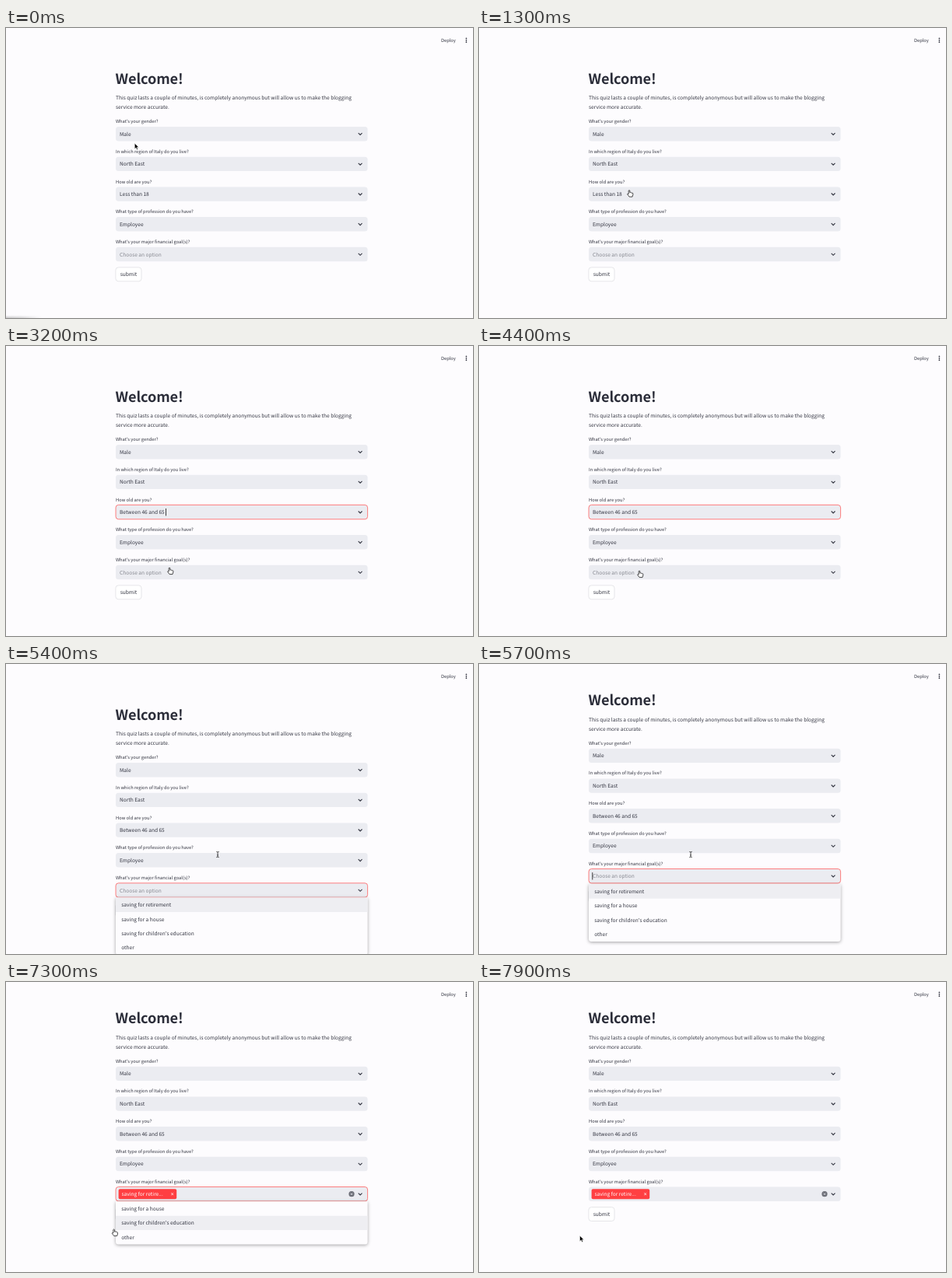
Animation of 600x373 px, one loop 8 s. Source, as an HTML page:

```html
<!DOCTYPE html>
<html lang="en">
<head>
<meta charset="utf-8">
<title>Welcome quiz</title>
<style>
  html, body { margin: 0; width: 100%; height: 100%; overflow: hidden; background: #fdfcfe; }
  svg { display: block; width: 600px; height: 373px; }
  text {
    font: 6.59px "Noto Sans CJK JP", "Noto Sans CJK SC", "Noto Sans CJK", "Noto Sans", sans-serif;
    fill: #31333f; text-rendering: geometricPrecision; white-space: pre;
  }
  text.small { font-size: 5.77px; }
  text.title { font-size: 18.13px; font-weight: 700; letter-spacing: -.1px; fill: #2b2d39; }
  text.hint { fill: #85878f; }
  text.light { fill: #fff; }
  .shadow { filter: drop-shadow(0 1.2px 2.2px rgba(0, 0, 0, .36)); }
</style>
</head>
<body>
<svg id="stage" viewBox="0 0 600 373">
  <defs>
    <linearGradient id="fade">
      <stop offset="0" stop-color="#888" stop-opacity=".5"/>
      <stop offset=".5" stop-color="#888" stop-opacity=".35"/>
      <stop offset="1" stop-color="#888" stop-opacity="0"/>
    </linearGradient>
    <filter id="soft" x="-10%" y="-100%" width="120%" height="300%">
      <feGaussianBlur stdDeviation="1 .9"/>
    </filter>
  </defs>
</svg>
<script>
const LOOP = 8000, STEP = 100;
const LEFT = 141, WIDTH = 323.6, ROW = 18.4, FIRST = 127, GAP = 38.7;
const INK = '#31333f', RED = '#ff4b4b';
const stage = document.getElementById('stage');

function add(parent, tag, attrs = {}, content) {
  const node = document.createElementNS('http://www.w3.org/2000/svg', tag);
  for (const key in attrs) node.setAttribute(key, attrs[key]);
  if (content) node.textContent = content;
  parent.append(node);
  return node;
}
const label = (parent, x, y, content, cls = '') => add(parent, 'text', { x, y, class: cls }, content);
const set = (node, key, value) => node.setAttribute(key, value);
const show = (node, on) => set(node, 'visibility', on ? 'visible' : 'hidden');

// Scrolling page
const page = add(stage, 'g');
label(page, LEFT - .4, 71.6, 'Welcome!', 'title');
label(page, LEFT, 92.2, 'This quiz lasts a couple of minutes, is completely anonymous but will allow us to make the blogging');
label(page, LEFT, 103.9, 'service more accurate.');

const fields = [
  ["What's your gender?", 'Male'],
  ['In which region of Italy do you live?', 'North East'],
  ['How old are you?', 'Less than 18'],
  ['What type of profession do you have?', 'Employee'],
  ["What's your major financial goal(s)?", 'Choose an option']
].map(([question, value], i) => {
  const top = FIRST + i * GAP;
  label(page, LEFT, top - 4.9, question, 'small');
  const box = add(page, 'rect', {
    x: LEFT, y: top, width: WIDTH, height: ROW, rx: 3.5, fill: '#ebecf1', 'stroke-width': .7
  });
  const text = label(page, 146, top + 11.7, value, i === 4 ? 'hint' : '');
  add(page, 'path', {
    d: `M452.7 ${top + 8.1}l2.4 2.4l2.4 -2.4`, fill: 'none', stroke: INK, 'stroke-width': 1.1
  });
  return { top, box, text };
});
const [age, goals] = [fields[2], fields[4]];

add(page, 'rect', {
  x: 140.9, y: 307.9, width: 33.1, height: 17.9, rx: 3.5, fill: '#fff', stroke: '#d5d6da', 'stroke-width': .6
});
label(page, 146.7, 319.4, 'submit');

const tag = add(page, 'g');
const mid = goals.top + ROW / 2;
add(tag, 'rect', { x: 144.6, y: mid - 6.5, width: 74.6, height: 13, rx: 1.9, fill: '#ff3f42' });
label(tag, 148.5, mid + 2.4, 'saving for retire...', 'light');
add(tag, 'circle', { cx: 444, cy: mid, r: 3.6, fill: '#6d6f78' });
const cross = (x, r, color) => add(tag, 'path', {
  d: `M${x - r} ${mid - r}l${2 * r} ${2 * r}m0 ${-2 * r}l${-2 * r} ${2 * r}`, stroke: color, 'stroke-width': .8
});
cross(213.6, 1.4, '#fff');
cross(444, 1.2, '#ebecf1');

const caret = add(page, 'rect', { width: .8, height: 9.4, fill: '#111' });

// Dropdown lists, rows measured from the list's own top edge
function makeList(options) {
  const group = add(stage, 'g');
  const height = options.length * ROW;
  add(group, 'path', {
    d: `M${LEFT} 0h${WIDTH}v${height - 3.5}q0 3.5 -3.5 3.5h${7 - WIDTH}q-3.5 0 -3.5 -3.5z`,
    fill: '#fdfcfe', class: 'shadow'
  });
  const hover = add(group, 'rect', { x: LEFT, width: WIDTH, height: ROW, fill: '#eeeef2' });
  options.forEach((option, i) => label(group, 148.2, i * ROW + 11.7, option));
  return { group, hover, count: options.length };
}
const savings = ['saving for retirement', 'saving for a house', "saving for children's education", 'other'];
const ageList = makeList(['Less than 18', 'Between 18 and 34', 'Between 35 and 45', 'Between 46 and 65', 'More than 65']);
const goalList = makeList(savings);
const restList = makeList(savings.slice(1));

// Fixed header and status bubble
label(stage, 559, 18.1, 'Deploy', 'small');
for (const cy of [13.4, 15.8, 18.2]) add(stage, 'circle', { cx: 591.4, cy, r: .85, fill: INK });
const bubble = add(stage, 'rect', {
  x: -4, y: 371.4, width: 49, height: 5, fill: 'url(#fade)', filter: 'url(#soft)'
});

// Pointers, with the hot spot at 0,0
const pointers = {
  arrow: add(stage, 'path', {
    d: 'M0 0V7.2L1.7 5.7L2.9 8.3L4.1 7.8L3 5.3H5.2Z', fill: '#000', stroke: '#fff', 'stroke-width': .5
  }),
  hand: add(stage, 'path', {
    d: 'M-.8 5V.6Q0 -.5 .8 .6V3.2Q1.6 2.5 2.2 3.4Q3 2.8 3.5 3.7Q4.6 3.3 4.8 4.4V6L4 8.6H.1L-2.4 5.3Q-2.3 4 -.8 5Z',
    fill: '#fff', stroke: '#111', 'stroke-width': .75, 'stroke-linejoin': 'round'
  }),
  beam: add(stage, 'path', {
    d: 'M-1.7 -3.6Q0 -3.6 0 -2.6V2.6Q0 3.6 -1.7 3.6M1.7 -3.6Q0 -3.6 0 -2.6M0 2.6Q0 3.6 1.7 3.6M-.8 .9H.8',
    fill: 'none', stroke: '#222', 'stroke-width': .8
  })
};

// time, x, y, pointer used from that time on
const route = [
  [0, 165.3, 148.2, 'arrow'],
  [200, 167, 160, 'hand'],
  [400, 173, 184, 'arrow'],
  [600, 181, 208, 'hand'],
  [700, 182.5, 212, 'hand'],
  [1100, 182.5, 212, 'hand'],
  [1300, 193, 208.5, 'hand'],
  [1500, 193, 208.5, 'hand'],
  [1900, 227, 248, 'hand'],
  [2000, 229, 252, 'hand'],
  [2300, 225, 262, 'hand'],
  [2700, 211, 284, 'hand'],
  [2900, 210, 285, 'hand'],
  [3400, 210, 285, 'hand'],
  [3900, 187, 293, 'hand'],
  [4300, 206, 289, 'hand'],
  [4900, 206, 289, 'hand'],
  [5300, 272, 245, 'beam'],
  [6100, 272, 245, 'hand'],
  [6700, 199, 290.5, 'hand'],
  [6800, 197.5, 291, 'hand'],
  [7000, 197.5, 291, 'hand'],
  [7400, 119, 327, 'arrow'],
  [7700, 122, 328, 'arrow'],
  [7900, 129.5, 326.2, 'arrow'],
  [8000, 129.5, 326.2, 'arrow']
];
const scrolling = [[5400, 0], [5500, 6], [5600, 14], [5700, 18.3]];
const caretOn = [[1500, 2100], [2600, 3400], [3900, 4300], [4600, 5100], [5600, 6100]];

function sample(table, t) {
  const i = table.findIndex(row => row[0] > t);
  if (i < 0) return table[table.length - 1];
  if (i === 0) return table[0];
  const a = table[i - 1], b = table[i];
  const k = (t - a[0]) / (b[0] - a[0]);
  return a.map((v, n) => typeof v === 'number' ? v + (b[n] - v) * k : v);
}
const within = (t, from, to) => t >= from && t < to;

function placeList(list, visible, top, y) {
  show(list.group, visible);
  set(list.group, 'transform', `translate(0 ${top})`);
  const row = Math.floor((y - top) / ROW);
  set(list.hover, 'y', Math.min(Math.max(row, 0), list.count - 1) * ROW);
}

function render(t) {
  const [, x, y, kind] = sample(route, t);
  const scroll = sample(scrolling, t)[1];
  set(page, 'transform', `translate(0 ${-scroll})`);

  const ageFocus = within(t, 1500, 4600), goalFocus = within(t, 4600, 7500);
  const picked = t >= 6900;
  set(age.box, 'stroke', ageFocus ? RED : 'none');
  set(goals.box, 'stroke', goalFocus ? RED : 'none');
  age.text.textContent = t < 2900 ? 'Less than 18' : 'Between 46 and 65';
  show(goals.text, !picked);
  show(tag, picked);

  show(caret, caretOn.some(([from, to]) => within(t, from, to)));
  set(caret, 'x', goalFocus ? 145.4 : t < 2900 ? 184.7 : 205);
  set(caret, 'y', (goalFocus ? goals.top : age.top) + 4.6);

  const lag = within(t, 5500, 5800) ? 1 : 0;
  const goalTop = goals.top + ROW + .4 - scroll + lag;
  placeList(ageList, within(t, 1500, 2900), age.top + ROW + .8, y);
  placeList(goalList, within(t, 4600, 6900), goalTop, y);
  placeList(restList, within(t, 6900, 7500), goalTop, y);

  show(bubble, t < 900);
  for (const name in pointers) show(pointers[name], name === kind);
  set(pointers[kind], 'transform', `translate(${x} ${y})`);
}

const start = performance.now();
function tick() {
  const t = (performance.now() - start) % LOOP;
  render(Math.floor(t / STEP) * STEP);
  requestAnimationFrame(tick);
}
tick();
</script>
</body>
</html>
```
